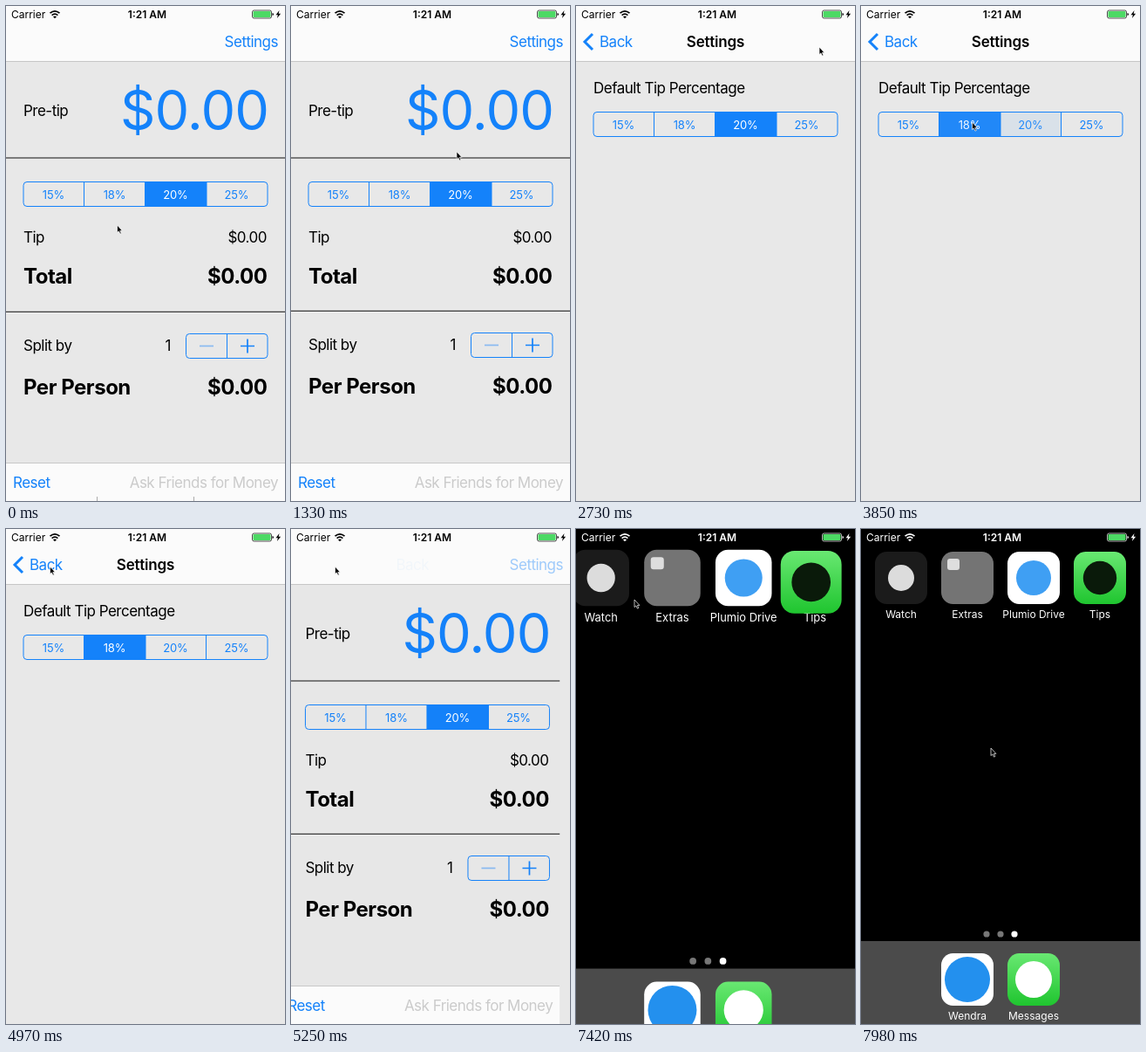
An HTML page for the animation above (8 s loop, 320 by 567 pixels).

```html
<!DOCTYPE html>
<html lang="en">
<head>
<meta charset="utf-8">
<title>Tip calculator</title>
<style>
  html, body { margin: 0; width: 100%; height: 100%; overflow: hidden; background: #000; }
  svg { display: block; width: 100%; height: 100%; font: 17px Inter, Roboto, sans-serif; }
  text { letter-spacing: -.03em; white-space: pre; }
  .blue { fill: #1482fa; }
  .line { fill: none; stroke: #1482fa; }
  .small { font-size: 13px; letter-spacing: -.01em; }
  .bold { font-size: 24px; font-weight: 700; letter-spacing: -.02em; }
  .title { font-weight: 600; letter-spacing: -.01em; }
  .huge { font-size: 63px; letter-spacing: -.015em; }
  .status { font-size: 12px; letter-spacing: 0; }
  .label { font-size: 12px; letter-spacing: 0; fill: #fff; }
</style>
</head>
<body>
<svg id="stage" viewBox="0 0 320 567" preserveAspectRatio="none"></svg>
<script>
const W = 320, H = 567, LOOP = 8000;
const PUSH = 1955, PICK = 3640, POP = 4971, HOME = 7143;

// Markup helpers
const text = (x, y, s, cls = '', anchor = 'start', attrs = '') =>
  `<text x="${x}" y="${y}" class="${cls}" text-anchor="${anchor}" ${attrs}>${s}</text>`;
const rect = (x, y, w, h, fill, attrs = '') =>
  `<rect x="${x}" y="${y}" width="${w}" height="${h}" fill="${fill}" ${attrs}/>`;
const dot = (x, y, r, fill) => `<circle cx="${x}" cy="${y}" r="${r}" fill="${fill}"/>`;
const group = (id, body, attrs = '') => `<g id="${id}" ${attrs}>${body}</g>`;

const RATES = ['15%', '18%', '20%', '25%'];
const segmentX = i => 20 + i * 70;
const selected = (i, y) => rect(segmentX(i) - .5, y, 71, 29, '#1482fa') +
  text(segmentX(i) + 34.5, y + 19.5, RATES[i], 'small', 'middle', 'fill="#fff"');
const segments = y =>
  `<rect x="20" y="${y + .5}" width="280" height="28" rx="4" class="line"/>` +
  RATES.map((rate, i) => text(segmentX(i) + 34.5, y + 19.5, rate, 'small blue', 'middle') +
    (i ? `<path d="M${segmentX(i) - .5} ${y + .5}v28" class="line"/>` : '')).join('');

const tile = (x, y, fill, inner = '') => rect(x, y, 60, 60, fill, 'rx="13.5"') + inner;
const label = (x, y, s) => text(x, y, s, 'label', 'middle');

const mainPage = rect(0, 0, W, H, '#e8e8e8') +
  text(20, 126, 'Pre-tip') + text(301, 142, '$0.00', 'huge blue', 'end') +
  rect(0, 173.5, W, 1, '#111') +
  segments(201) + selected(2, 201) +
  text(20, 271, 'Tip') + text(299, 271, '$0.00', '', 'end') +
  text(20, 318, 'Total', 'bold') + text(299.5, 318, '$0.00', 'bold', 'end') +
  group('split',
    rect(0, 348.8, W, 1, '#111') +
    text(20, 394, 'Split by') + text(189, 394, '1', '', 'end') +
    `<rect x="206.5" y="374.5" width="93.5" height="28" rx="4" class="line"/>
     <path d="M253.5 374.5v28" class="line"/>
     <path d="M269 388.5h16M277 380.5v16" class="line" stroke-width="1.7"/>
     <path d="M222 388.5h16" class="line" stroke-width="1.7" opacity=".45"/>` +
    text(20, 444, 'Per Person', 'bold') + text(299.5, 444, '$0.00', 'bold', 'end'));

const toolbar = rect(0, 523, W, 44, '#fbfbfb') + rect(0, 523, W, .7, '#b4b4b4') +
  text(8, 552, 'Reset', 'blue') +
  text(312, 552, 'Ask Friends for Money', '', 'end', 'fill="#cbcbcb"');

const settingsPage = rect(0, 0, W, H, '#e8e8e8') +
  text(20, 100, 'Default Tip Percentage') + segments(121) +
  group('pick18', selected(1, 121)) + group('pick20', selected(2, 121));

const navBar = rect(0, 0, W, 64, '#fbfbfb') + rect(0, 63.3, W, .7, '#b0b0b0') +
  text(312, 47, 'Settings', 'blue', 'end', 'id="button"') +
  '<path id="chevron" d="M19 32l-9 9l9 9" class="line" stroke-width="3"/>' +
  text(27, 47, 'Back', 'blue', 'start', 'id="back"') +
  text(160, 47, 'Settings', 'title', 'middle', 'id="title"');

const homeScreen =
  tile(16, 26, '#1b1b1b', dot(46, 56, 15, '#dcdcdc')) + label(46, 102.5, 'Watch') +
  tile(92, 26, '#747474', rect(99, 34, 14, 13, '#dedede', 'rx="3"')) + label(122, 102.5, 'Extras') +
  tile(168, 26, '#fff', dot(198, 56, 20, '#3f9ff3')) + label(198, 102.5, 'Plumio Drive') +
  label(274, 102.5, 'Tips') +
  [144, 160, 176].map((x, i) => dot(x, 464, 3.6, i < 2 ? '#777' : '#fff')).join('') +
  rect(0, 472, W, 95, '#4b4b4b') +
  tile(92, 486, '#fff', dot(122, 516, 26, '#2390ee')) + label(122, 562.5, 'Wendra') +
  tile(168, 486, 'url(#green)', dot(198, 516, 21, '#fff')) + label(198, 562.5, 'Messages');

const statusBar = text(6, 14, 'Carrier', 'status') +
  `<g fill="none" stroke="currentColor" stroke-width="1.7">
     <path d="M50.5 8.2q5.5-4.8 11 0M52.6 10.6q3.4-2.8 6.8 0"/></g>` +
  '<path d="M54 12.2q2-1.5 4 0l-2 2z"/>' +
  text(162, 14, '1:21 AM', 'title status', 'middle') +
  `<rect x="282.5" y="5" width="22" height="9" rx="2" fill="none" stroke="currentColor" stroke-width=".7"/>
   <path d="M305.5 8v3q1.5-.4 1.5-1.5t-1.5-1.5z"/>` +
  rect(283.5, 6, 20, 7, '#4cd964', 'rx="1"') +
  '<path d="M313.5 5l-4 5.2h2.4l-1 3.8l4.2-5.3h-2.5z"/>';

document.getElementById('stage').innerHTML = `
  <defs>
    <clipPath id="screen"><rect width="${W}" height="${H}"/></clipPath>
    <linearGradient id="green" x2="0" y2="1">
      <stop stop-color="#69e872"/><stop offset="1" stop-color="#1fc52f"/>
    </linearGradient>
  </defs>` +
  rect(0, 0, W, H, '#000') +
  group('home', homeScreen) +
  group('app',
    group('main', mainPage) + rect(0, 0, W, H, '#000', 'id="dim"') +
    group('tools', toolbar) +
    group('keys', '<path d="M104.5 0v220M215.5 0v220" stroke="#aaa"/>') +
    group('sheet', settingsPage) + navBar, 'clip-path="url(#screen)"') +
  group('icon', '<rect id="iconTile" fill="url(#green)"/><circle id="iconMark" fill="#0a1a0a"/>') +
  group('status', statusBar) +
  group('cursor', '<path d="M0 0v8.6l1.9-1.7l1.5 3.2l1.4-.6l-1.4-3.1h2.5z" fill="#000" stroke="#fff" stroke-width=".7"/>');

const el = {};
document.querySelectorAll('[id]').forEach(node => el[node.id] = node);
const set = (id, attrs) => {
  for (const key in attrs) el[id].setAttribute(key, attrs[key]);
};
const move = (id, x, y = 0) => set(id, { transform: `translate(${x} ${y})` });
const show = (id, alpha) => set(id, { opacity: alpha });

const clamp = v => Math.min(1, Math.max(0, v));
const mix = (a, b, k) => a + (b - a) * k;
// Critically damped spring, from 0 to 1
const spring = ms => {
  const a = Math.max(0, ms) * .01826;
  return 1 - (1 + a) * Math.exp(-a);
};

// Pointer stops: time, x, y
const STOPS = [
  [0, 127.5, 251], [1000, 127.5, 251], [1750, 279, 47], [3420, 279, 47],
  [3600, 127.5, 133], [3900, 127.5, 133], [4250, 58, 44], [4450, 50.5, 43],
  [6000, 50.5, 43], [6500, 67, 81], [7560, 67, 81], [7940, 149, 251], [LOOP, 149, 251]
];
function pointer(t) {
  const i = STOPS.findIndex(stop => stop[0] > t);
  const [t0, x0, y0] = STOPS[i - 1], [t1, x1, y1] = STOPS[i];
  const k = (t - t0) / (t1 - t0), eased = k * k * (3 - 2 * k);
  return [mix(x0, x1, eased), mix(y0, y1, eased)];
}

function drawNavigation(t) {
  const p = spring(t - PUSH) - spring(t - POP);
  const popping = t >= POP, start = popping ? POP : PUSH;
  const fadeIn = clamp((t - start - 100) / 450);
  const fadeOut = 1 - clamp((t - start) / 175);
  move('main', -96 * p);
  show('dim', .1 * p);
  move('tools', -W * p);
  move('sheet', W * (1 - p));
  move('back', (popping ? 97 : 110) * (1 - p));
  move('title', 221 * (1 - p));
  show('back', p);
  show('title', p);
  show('button', popping ? fadeIn : fadeOut);
  show('chevron', popping ? fadeOut : fadeIn);
}

function drawHome(t) {
  const atHome = t >= HOME, r = 1 - spring(t - HOME);
  const x = mix(244, 0, r), y = mix(26, 0, r);
  const w = mix(60, W, r), h = mix(60, H, r ** 1.15);
  const cover = clamp((t - HOME) / 200), zoom = 1 + 2 * r;
  show('home', +atHome);
  set('home', { transform: `translate(274 56) scale(${zoom}) translate(-274 -56)` });
  show('app', cover < 1 ? 1 : 0);
  set('app', { transform: `translate(${x} ${y}) scale(${w / W} ${h / H})` });
  show('icon', cover);
  set('iconTile', { x, y, width: w, height: h, rx: w * .225 });
  set('iconMark', { cx: x + w / 2, cy: y + h / 2, r: w * .32 });
  const ink = atHome ? '#fff' : '#000';
  set('status', { fill: ink, color: ink });
}

function draw(t) {
  const settle = Math.exp(-t / 60);
  move('split', 0, settle);
  move('keys', 0, H - 5 * settle);
  show('keys', t < 200 ? 1 : 0);
  const picked = clamp((t - PICK) / 225);
  show('pick18', picked);
  show('pick20', 1 - picked);
  drawNavigation(t);
  drawHome(t);
  move('cursor', ...pointer(t));
}

const begin = performance.now();
function tick() {
  draw((performance.now() - begin) % LOOP);
  requestAnimationFrame(tick);
}
tick();
</script>
</body>
</html>
```
